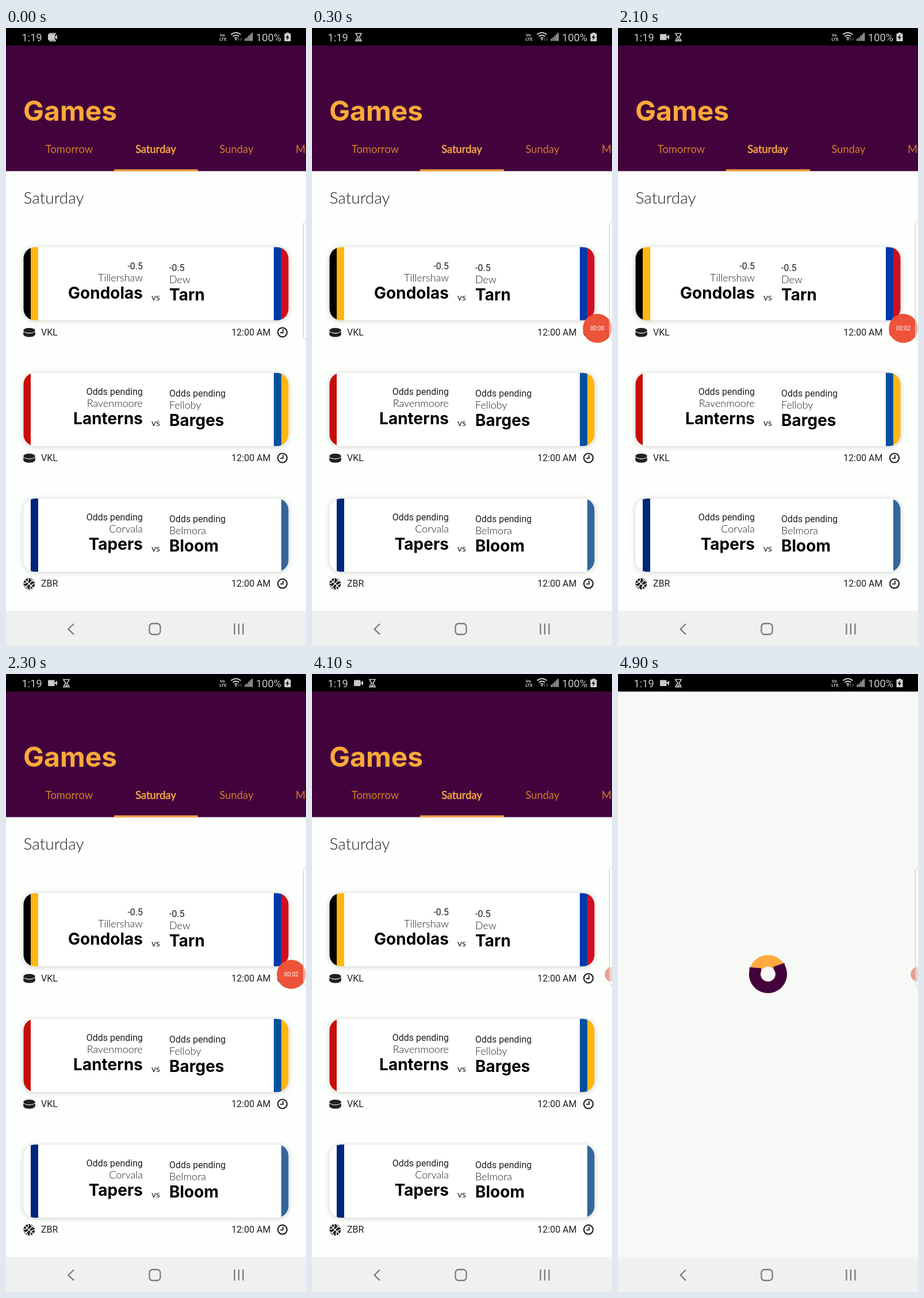
Write an HTML page that moves like this. It is 522 px wide and 1073 px high and loops after 5 s.

```html
<!DOCTYPE html>
<html lang="en">
<head>
<meta charset="utf-8">
<title>Games</title>
<style>
  html, body { margin: 0; width: 100%; height: 100%; overflow: hidden; background: #fdfffd; }
  svg { display: block; width: 522px; height: 1073px; }
  text { font-family: Roboto, sans-serif; font-size: 16px; fill: #202020; }
  .title, .team { font-family: Inter, sans-serif; font-weight: 700; }
  .title { font-size: 48px; fill: #ffa93a; }
  .team { font-size: 28px; fill: #000; }
  .tab, .day, .city, .vs { font-family: Lato, sans-serif; }
  .tab { font-size: 18.4px; fill: #d27b2c; }
  .on { fill: #ffad45; stroke: #ffad45; stroke-width: .45px; }
  .day { font-size: 28px; font-weight: 300; }
  .city { font-size: 18px; font-weight: 300; }
  .end { text-anchor: end; }
  .mid { text-anchor: middle; }
  .status text { fill: #c9c9c9; font-size: 18.3px; }
  .status .tiny { font-size: 7.5px; font-weight: 700; }
  .card { filter: drop-shadow(0 1px 5px rgba(0, 0, 0, .2)); }
</style>
</head>
<body>
<svg viewBox="0 0 522 1073">
  <defs>
    <clipPath id="round"><rect x="30.5" y="380.5" width="461" height="127" rx="20"/></clipPath>
    <g id="clock" fill="none" stroke="#202020" stroke-width="2.2">
      <circle cx="481" cy="528.3" r="8"/><path d="M482 523v6h-5" stroke-width="1.8"/>
    </g>
    <g id="puck" fill="#202020">
      <ellipse cx="40.5" cy="525" rx="10.3" ry="4.3"/>
      <path d="M30.2 527.5q10.3 6 20.6 0v5q-2 4-10.3 4t-10.3-4z"/>
    </g>
    <g id="ball">
      <circle cx="40.3" cy="528.5" r="10" fill="#202020"/>
      <path d="M32 520.5l16.500 16M48 520.500l-16 16M38 518q4 7-7.500 10.500M50 528q-11 4-7 11M43 518q0 5 8 7M30 532q7 0 8 7" fill="none" stroke="#fdfffd" stroke-width="1.4"/>
    </g>
  </defs>

  <rect width="522" height="1073" fill="#fdfffd"/>
  <g id="games">
    <rect y="30" width="522" height="218.500" fill="#42033d"/>
    <text class="title" x="30" y="161">Games</text>
    <text class="tab mid" x="110" y="216.500">Tomorrow</text>
    <text class="tab mid on" x="260.500" y="216.500">Saturday</text>
    <text class="tab mid" x="401" y="216.500">Sunday</text>
    <text class="tab" x="504" y="216.500">Monday</text>
    <rect x="188" y="245.500" width="146" height="3" fill="#ffa93a"/>
    <text class="day" x="30.500" y="305">Saturday</text>
    <g id="cards"></g>
  </g>

  <g id="loading">
    <rect y="30" width="522" height="982" fill="#f7f9f6"/>
    <circle cx="261" cy="521" r="23" fill="none" stroke="#ffa93f" stroke-width="20"/>
    <path id="arc" fill="#42033d" transform="translate(261 521)"/>
  </g>

  <g id="bubble">
    <circle id="disc" cy="521.500"/>
    <text id="timer" class="mid" style="fill:#fff"></text>
  </g>
  <rect x="517.500" y="335.500" width="20" height="206" rx="6" fill="#fff" fill-opacity=".5" stroke="#c4c4c4"/>

  <g class="status">
    <rect width="522" height="30.500"/>
    <text x="27.500" y="22.500">1:19</text>
    <g id="camera" fill="#c9c9c9"><rect x="73" y="10.500" width="11.500" height="10.500" rx="1"/><path d="M84 15.800l5-4.300v8.600z"/></g>
    <g id="glass" fill="none" stroke="#c9c9c9" stroke-width="1.700">
      <path d="M-6 9.500H6M-6 22.500H6M-4 9.500v2.500L-1 16l-3 4v2.500M4 9.500v2.500L1 16l3 4v2.500"/>
      <path d="M-3 21.500L0 18l3 3.500z" fill="#c9c9c9" stroke="none"/>
    </g>
    <text class="tiny" x="372" y="14.500">Vo</text>
    <text class="tiny" x="371.500" y="21.500">LTE</text>
    <g fill="none" stroke="#c9c9c9" stroke-width="1.800">
      <path d="M391.500 11.500q8.500-7 17 0M394.500 14.800q5.500-4.500 11 0M397.300 17.800q2.700-2 5.400 0"/>
      <path d="M405 17v5M409 17v5" stroke="#777" stroke-width="1.200"/>
      <path d="M416.500 22.500v-4M419.500 22.500v-6M422.500 22.500v-9M425.300 22.500v-11.500M428 22.500V8.500"/>
    </g>
    <circle cx="400" cy="20" r="1.500" fill="#c9c9c9"/>
    <text x="435" y="22.500">100%</text>
    <path d="M488 8h4v1.500h2.500q1 0 1 1V22q0 1-1 1h-9q-1 0-1-1V10.500q0-1 1-1H488z" fill="#d4d4d4"/>
    <path d="M491 11l-4.500 6h3l-1 4.500 4.500-6h-3z"/>
  </g>

  <rect y="1012" width="522" height="61" fill="#eff1ee"/>
  <g fill="none" stroke="#7b7c7b" stroke-width="2.300">
    <path d="M118 1034.500l-9.500 9.200 9.500 9.200M397.500 1034v19M405 1034v19M412.500 1034v19"/>
    <rect x="249.500" y="1034" width="19" height="19" rx="5.500"/>
  </g>
</svg>
<script>
const $ = id => document.getElementById(id);

// Stripe colours run left to right; each side is [odds, city, team].
const games = [
  { icon: 'puck', league: 'VKL', stripes: ['#000', '#ffb711', '#0039a8', '#ce1020'],
    home: ['-0.5', 'Tillershaw', 'Gondolas'], away: ['-0.5', 'Dew', 'Tarn'] },
  { icon: 'puck', league: 'VKL', stripes: ['#c90d08', '#fff', '#00509c', '#ffb512'],
    home: ['Odds pending', 'Ravenmoore', 'Lanterns'], away: ['Odds pending', 'Felloby', 'Barges'] },
  { icon: 'ball', league: 'ZBR', stripes: ['#fff', '#00267a', '#fff', '#34669a'],
    home: ['Odds pending', 'Corvala', 'Tapers'], away: ['Odds pending', 'Belmora', 'Bloom'] }
];

const label = (text, x, y, cls = '') => `<text class="${cls}" x="${x}" y="${y}">${text}</text>`;
const side = ([odds, city, team], x, y, cls) =>
  label(odds, x, y, cls) + label(city, x, y + 21, 'city ' + cls) + label(team, x, y + 51, 'team ' + cls);

$('cards').innerHTML = games.map((g, i) => `<g transform="translate(0 ${i * 218.2})">
  <g class="card"><g clip-path="url(#round)">
    <rect x="30" y="380" width="462" height="128" fill="#fff"/>
    ${g.stripes.map((c, k) => `<rect x="${[30, 43, 466, 479][k]}" y="380" width="13" height="128" fill="${c}"/>`).join('')}
  </g></g>
  ${side(g.home, 238, 419, 'end')}${side(g.away, 284, 421.5, '')}
  ${label('vs', 260.5, 473, 'vs mid')}
  <use href="#${g.icon}"/>${label(g.league, 61, 534)}
  ${label('12:00 AM', 460.5, 534, 'end')}<use href="#clock"/>
</g>`).join('');

const point = (r, deg) => {
  const a = deg * Math.PI / 180;
  return `${(r * Math.cos(a)).toFixed(2)} ${(r * Math.sin(a)).toFixed(2)}`;
};

// Ring segment whose ends lean towards its chord.
function segment(from, to) {
  const large = to - from > 180 ? 1 : 0;
  return `M${point(34.4, from + 6)}L${point(33, from + 14)}` +
    `A33 33 0 ${large} 1 ${point(33, to - 14)}L${point(34.4, to - 6)}` +
    `L${point(15.8, to + 14)}L${point(13, to)}` +
    `A13 13 0 ${large} 0 ${point(13, from)}L${point(15.8, from - 14)}Z`;
}

const clamp = v => Math.max(0, Math.min(1, v));
const show = (el, on) => el.setAttribute('visibility', on ? 'visible' : 'hidden');

function bubble(t) {
  const [x, r, alpha, color, size] =
    t < 3100 ? [496.5, 25.3, t < 200 ? .5 : 1, '#ed5339', 10] :
    t < 4100 ? [507, 20.3, .72, '#e2614c', 8.2] :
               [522, 12.7, .6, '#d9634f', 0];
  const disc = $('disc'), timer = $('timer');
  show($('bubble'), t >= 100);
  disc.setAttribute('cx', x);
  disc.setAttribute('r', r);
  disc.setAttribute('fill', color);
  disc.setAttribute('fill-opacity', alpha);
  timer.setAttribute('x', x);
  timer.setAttribute('y', 521.5 + size * .35);
  timer.style.fontSize = size + 'px';
  timer.textContent = size ? '00:0' + Math.max(0, Math.floor((t - 100) / 1000)) : '';
}

function draw(now) {
  const t = Math.floor(now % 5000 / 100) * 100;
  const slide = clamp((t - 300) / 300);
  $('camera').setAttribute('opacity', t < 100 ? 1 : slide);
  $('glass').setAttribute('transform', `translate(${81 + 24 * slide} 0)`);
  bubble(t);
  show($('games'), t < 4700);
  show($('loading'), t >= 4700);
  const p = clamp((t - 4700) / 200);
  $('arc').setAttribute('d', segment(-91 + 51 * p, -25 + 231 * p));
}

const start = performance.now();
function loop() {
  draw(performance.now() - start);
  requestAnimationFrame(loop);
}
loop();
</script>
</body>
</html>
```
